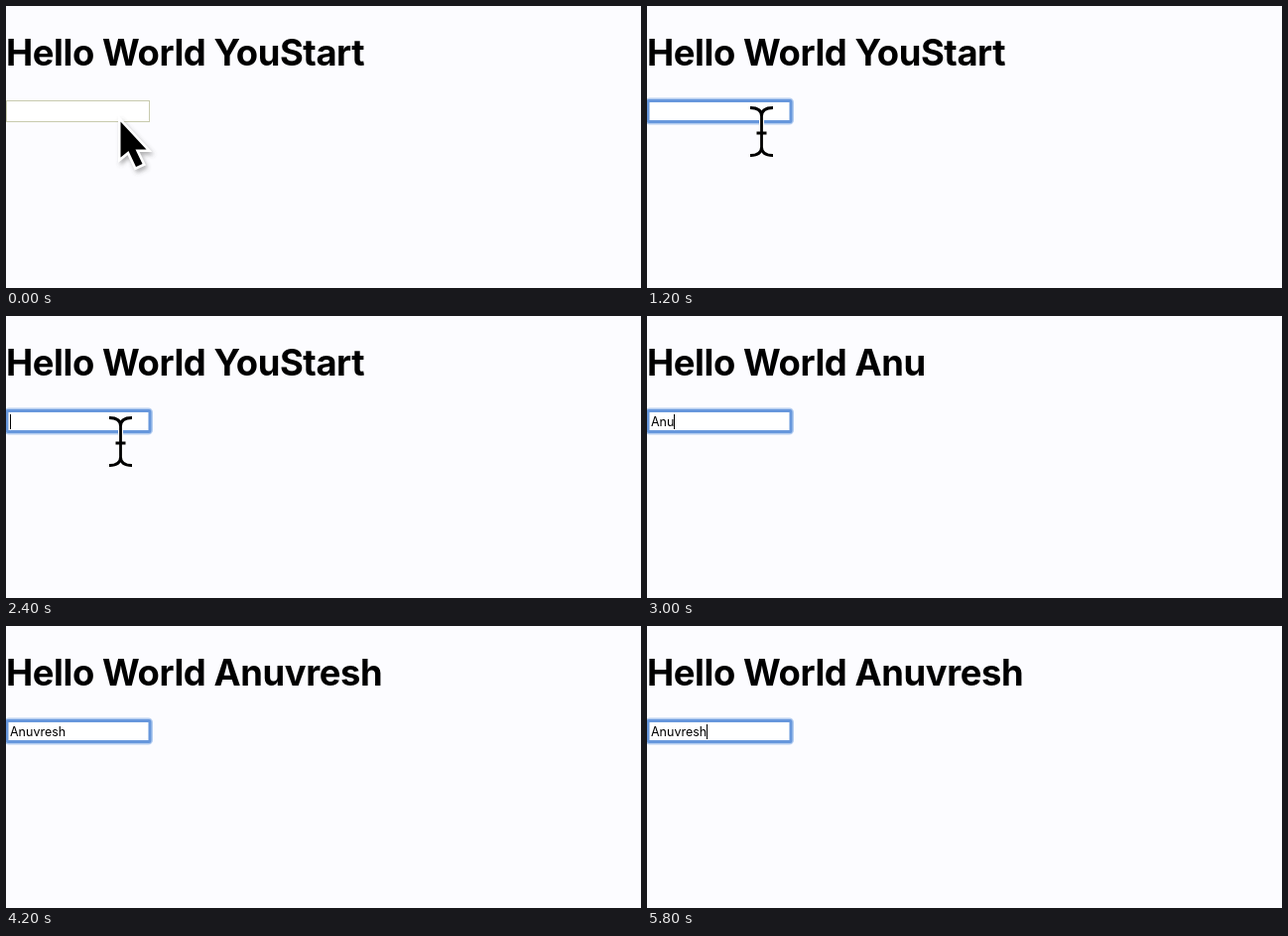
Write an HTML page that moves like this. It is 640 px wide and 284 px high and loops after 6000 ms.

```html
<!DOCTYPE html>
<html lang="en">
<head>
<meta charset="utf-8">
<style>
  html, body { margin: 0; width: 100%; height: 100%; overflow: hidden; background: #fcfcff; }
  svg { display: block; }
  text { font-family: Inter, "Open Sans", sans-serif; fill: #000; white-space: pre; }
  #title { font-size: 36.4px; font-weight: 700; letter-spacing: -.42px; }
  #value { font-size: 12.5px; }
</style>
</head>
<body>
<svg width="640" height="284" viewBox="0 0 640 284">
  <defs>
    <filter id="shadow" x="-30%" y="-30%" width="180%" height="180%">
      <feDropShadow dx="2" dy="3" stdDeviation="2" flood-color="#555" flood-opacity=".45"/>
    </filter>
    <path id="stem" fill="none" d="M104 102.5C111 102.5 115.5 105 115.5 111V142C115.5 148 111 150.5 104 150.5
      M127 102.5C120 102.5 115.5 105 115.5 111M115.5 142C115.5 148 120 150.5 127 150.5M110.5 128H120.5"/>
  </defs>
  <text id="title" x="0" y="60"></text>

  <rect id="plain" x=".5" y="95.5" width="144" height="21" fill="#fff" stroke="#c8caae"/>
  <g id="focus">
    <rect x=".5" y="95" width="145" height="22" rx="2" fill="#fff" stroke="#b4cdf0" stroke-width="5"/>
    <rect x="1" y="95.5" width="144" height="21" rx="1" fill="#fff" stroke="#6797dc" stroke-width="3"/>
  </g>
  <text id="value" x="4" y="111"></text>
  <rect id="caret" y="99" width="1" height="15"/>

  <path id="arrow" d="M115.5 116.5V152.5L123.5 146L131 162L137.5 159L130.5 144.5H141.5Z"
        stroke="#fff" stroke-width="5" paint-order="stroke" filter="url(#shadow)"/>
  <g id="beam">
    <use href="#stem" stroke="#fff" stroke-width="5"/>
    <use href="#stem" stroke="#000" stroke-width="2.8"/>
  </g>
</svg>
<script>
const LOOP = 6000, STEP = 200, BLINK = 530;
const FOCUS = 200, TYPE = 2600, DONE = 3600;
const NAME = "Anuvresh";
const typed = [1, 2, 3, 5, 6, 8]; // letters present after each step of typing
const $ = id => document.getElementById(id);
const show = (id, on) => $(id).setAttribute("visibility", on ? "visible" : "hidden");

function draw(now) {
  const t = Math.floor(now % LOOP / STEP) * STEP;
  const step = Math.floor((t - TYPE) / STEP);
  const word = step < 0 ? "" : NAME.slice(0, typed[Math.min(step, typed.length - 1)]);
  const focused = t >= FOCUS;
  const blinkStart = t < TYPE ? FOCUS : DONE;
  const lit = t >= TYPE && t < DONE || Math.floor((t - blinkStart) / BLINK) % 2 === 0;

  $("title").textContent = "Hello World " + (word || "YouStart");
  $("value").textContent = word;
  $("caret").setAttribute("x", 4 + Math.round(word ? $("value").getComputedTextLength() : 0));
  show("plain", !focused);
  show("focus", focused);
  show("caret", focused && lit);
  show("arrow", !focused);
  show("beam", focused && t < TYPE);
}

const start = performance.now();
function tick() {
  draw(performance.now() - start);
  requestAnimationFrame(tick);
}
tick();
</script>
</body>
</html>
```
